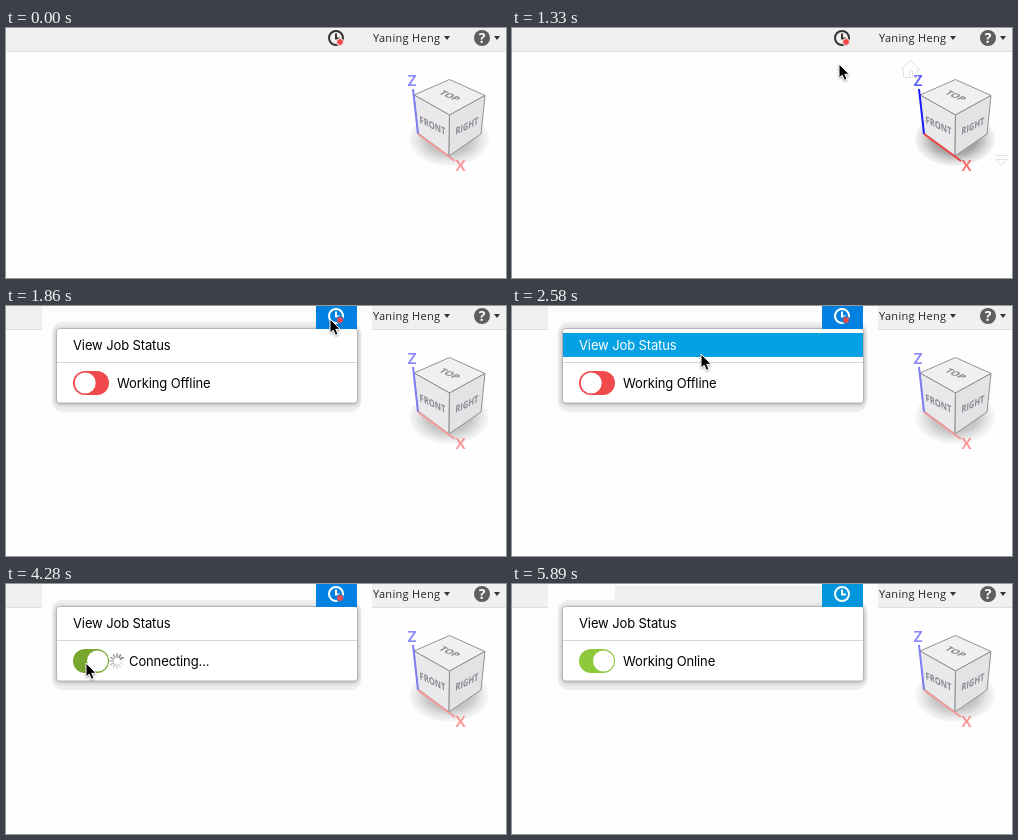
Write an HTML page that moves like this. It is 500 px wide and 250 px high and loops after 6.69 s.

```html
<!DOCTYPE html>
<html lang="en">
<head>
<meta charset="utf-8">
<title>Job status menu</title>
<style>
  html, body { margin: 0; width: 100%; height: 100%; overflow: hidden; background: #fefefe; }
  svg { display: block; }
  .bar { font: 11px "Open Sans", sans-serif; letter-spacing: .3px; fill: #222; }
  .menu { font: 13px Inter, sans-serif; letter-spacing: -.12px; fill: #000; }
  .face { font: bold 10px "Open Sans", sans-serif; fill: #85888c; text-anchor: middle; }
  .axis { font: bold 15px Lato, sans-serif; text-anchor: middle; }
  .help { font: bold 14px "Open Sans", sans-serif; text-anchor: middle; fill: #fff; }
  #panel { filter: drop-shadow(0 1.5px 2px rgba(0, 0, 0, .28)); }
  #cursor { filter: drop-shadow(0 1px 1px rgba(0, 0, 0, .35)); }
</style>
</head>
<body>
<svg width="500" height="250" viewBox="0 0 500 250">
  <defs>
    <radialGradient id="shade">
      <stop offset=".55" stop-color="#a6a6a6"/>
      <stop offset=".82" stop-color="#dcdcdc"/>
      <stop offset="1" stop-color="#f5f5f5"/>
    </radialGradient>
  </defs>

  <rect width="500" height="23" fill="#f0f0f0"/>
  <path d="M0 23.5H500" stroke="#dedede"/>

  <g id="cube">
    <ellipse id="shadow" cx="443" cy="111" rx="40" ry="27" fill="url(#shade)"/>
    <g stroke="#85878a" stroke-width=".9" stroke-linejoin="round">
      <path d="M443.500 51.500L479 67.500 443.500 87 408 67Z" fill="#f0f0f1"/>
      <path d="M408 67L443.500 87 443 128 412 105Z" fill="#e9e9eb"/>
      <path d="M443.500 87L479 67.500 475 106 443 128Z" fill="#e3e3e5"/>
    </g>
    <text class="face" transform="matrix(.9 .42 -.8 .45 444 67.500)" y="4">TOP</text>
    <text class="face" transform="matrix(.76 .36 .06 1 426.500 97)" y="4">FRONT</text>
    <text class="face" transform="matrix(.75 -.36 -.06 1 461 97.500)" y="4">RIGHT</text>
    <g stroke-width="2">
      <path id="zAxis" d="M412 106L407 61"/>
      <path id="xAxis" d="M412 106L449 133"/>
    </g>
    <g id="axisNames" class="axis">
      <text x="406" y="58" fill="#2a2aff">Z</text>
      <text x="454.500" y="143" fill="#ff4040">X</text>
    </g>
    <g id="cubeTools" fill="none" stroke="#e2e2e2">
      <path d="M389 41.500L398.500 32.500 408 41.500H405.500V49.500H391.500V41.500ZM397.500 49V43H400.500V49"/>
      <path d="M483 127.500H496M484 131.500H495L489.500 137.500Z"/>
    </g>
  </g>

  <g id="menu">
    <rect x="36" width="330" height="112" fill="#fdfdfd"/>
    <rect id="strip" x="103" y="2" width="207" height="20" fill="#efefef"/>
    <rect x="46" y="16" width="309" height="90" rx="11" fill="#eeeeee"/>
    <rect id="panel" x="50.500" y="22.500" width="301" height="74.500" rx="3" fill="#fff" stroke="#b4b4b4"/>
    <rect id="item" x="51" y="27" width="300" height="24" fill="#06a0e4"/>
    <path d="M51 56.500H351" stroke="#d6d6d6"/>
    <text id="itemText" class="menu" x="67" y="44">View Job Status</text>
    <rect id="pill" x="67" y="65" width="36" height="24" rx="12"/>
    <circle id="knob" r="10.500" fill="#fff"/>
    <g id="spinner" stroke="#777" stroke-width="1.500" stroke-linecap="round"></g>
    <text id="label" class="menu" y="82"></text>
  </g>

  <rect id="button" x="310" width="41" height="23"/>
  <g id="clock" fill="none" stroke-width="2">
    <circle cx="330" cy="10" r="7"/>
    <path d="M330 5.500V10.500H334"/>
  </g>
  <circle id="dot" cx="334" cy="14" r="3.500" fill="#f0494c"/>

  <text class="bar" x="367" y="14">Yaning Heng</text>
  <path d="M438 8H444L441 12ZM488 8H494L491 12Z" fill="#333"/>
  <circle cx="476" cy="10" r="8" fill="#5e5e5e"/>
  <text class="help" x="476" y="15">?</text>

  <path id="cursor" d="M0 0V14L3.200 11.200 5.500 16.300 8 15.200 5.800 10.300H10.200Z" fill="#000" stroke="#fff"/>
</svg>

<script>
const LOOP = 6690, START = 800, TICK = 89.3;
const $ = id => document.getElementById(id);
const set = (id, attrs) => {
  for (const key in attrs) $(id).setAttribute(key, attrs[key]);
};
const show = (id, on) => set(id, { visibility: on ? 'inherit' : 'hidden' });
const clamp = v => Math.min(1, Math.max(0, v));
const ease = v => v * v * (3 - 2 * v);

// Cursor stops: tick, x, y
const stops = [
  [0, 247, 214], [6, 327, 36], [7, 325, 23], [8, 324, 13], [14, 324, 13],
  [15, 316, 15], [20, 189, 48], [22, 117, 74], [23, 85, 79], [24, 77, 79],
  [31, 77, 79], [33, 80, 79], [51, 80, 79], [56, 57, 210]
];

function cursorAt(n) {
  let i = 0;
  while (i < stops.length - 2 && n >= stops[i + 1][0]) i++;
  const [a, ax, ay] = stops[i], [b, bx, by] = stops[i + 1];
  const linear = clamp((n - a) / (b - a));
  const p = i ? linear : ease(linear);
  return [ax + (bx - ax) * p, ay + (by - ay) * p];
}

for (let i = 0; i < 12; i++) {
  $('spinner').innerHTML +=
    `<path d="M0-4V-7" transform="rotate(${i * 30})" opacity="${(i + 1) / 12}"/>`;
}

function draw(time) {
  const n = Math.floor((time - START) / TICK + .15);
  const between = (a, b) => n >= a && n < b;
  const [x, y] = cursorAt(n);

  show('cursor', between(0, 57));
  set('cursor', { transform: `translate(${x} ${y})` });

  const near = between(3, 9);
  set('zAxis', { stroke: near ? '#1a1aff' : '#7f7df2' });
  set('xAxis', { stroke: near ? '#f04444' : '#f49a9a' });
  set('axisNames', { opacity: near ? .75 : .55 });
  set('shadow', { opacity: near ? 1 : .65 });
  show('cubeTools', near);

  const open = n >= 11, online = n >= 47;
  show('menu', open);
  show('strip', online);

  const itemHover = between(15, 24) && y > 27 && y < 52;
  show('item', itemHover);
  $('itemText').style.fill = itemHover ? '#fff' : '';

  const slide = ease(clamp((n - 31) / 3));
  const pressed = n === 31;
  const toggleHover = between(23, 53);
  const [hover, plain] = slide < .5 ? ['#c83b40', '#f04a4d'] : ['#78a72f', '#8dc93a'];
  set('pill', { fill: toggleHover ? hover : plain });
  set('knob', { cx: 79.2 + 12.3 * slide, cy: pressed ? 78 : 77, stroke: pressed ? '#111' : 'none' });

  const busy = between(33, 47);
  show('spinner', busy);
  set('spinner', { transform: `translate(111 77) rotate(${n * 30})` });
  set('label', { x: busy ? 123 : 111 });
  $('label').textContent = busy ? 'Connecting...' : online ? 'Working Online' : 'Working Offline';

  const active = n >= 9;
  const buttonFill = n < 50 ? '#0080e0' : '#0095dc';
  show('button', active);
  set('button', { fill: buttonFill });
  set('clock', { stroke: !active ? '#333' : between(47, 50) ? '#123a63' : '#fff' });
  show('dot', !online);
  set('dot', { stroke: active ? buttonFill : '#f0f0f0' });
}

function loop() {
  draw(performance.now() % LOOP);
  requestAnimationFrame(loop);
}
loop();
</script>
</body>
</html>
```
